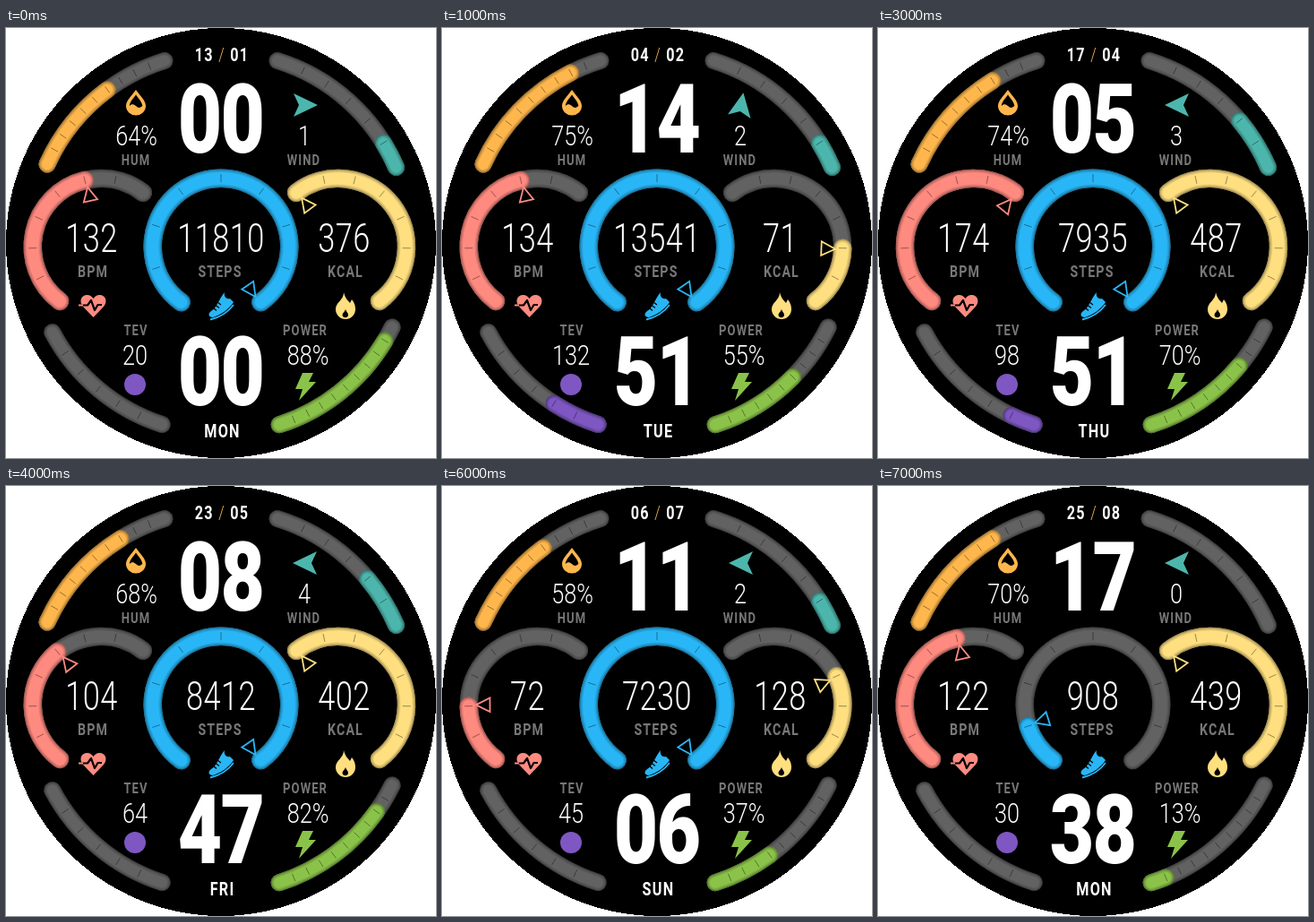
Animation, 480 px wide and 480 px high, one loop 8000 ms. Source, as an HTML page:

```html
<!DOCTYPE html>
<html lang="en">
<head>
<meta charset="utf-8">
<title>Watch face</title>
<style>
html, body { margin: 0; width: 100%; height: 100%; overflow: hidden; background: #fff; }
svg { display: block; width: 100vw; height: 100vh; }
text { font-family: Roboto, "Open Sans", sans-serif; text-anchor: middle; fill: #fff; }
.big { font-size: 108px; font-weight: 800; letter-spacing: -2px; }
.main { font-size: 43.5px; font-weight: 350; letter-spacing: .5px; }
.mid { font-size: 32px; font-weight: 350; }
.date { font-size: 20.5px; font-weight: 600; letter-spacing: 1.6px; }
.label { font-size: 18px; font-weight: 600; fill: #777; letter-spacing: 1.4px; }
.small { font-size: 16.5px; }
</style>
</head>
<body>
<svg id="face" viewBox="0 0 480 480" xmlns="http://www.w3.org/2000/svg"></svg>
<script>
const STEP = 1000;
const NARROW = .79; // one condensed cut for all lettering
const GRAY = '#626262', ORANGE = '#ffb74d', TEAL = '#4db6ac', RED = '#ff8a80',
      BLUE = '#29b6f6', YELLOW = '#ffdf80', PURPLE = '#7e57c2', GREEN = '#8bc34a';
const DAYS = ['MON', 'TUE', 'WED', 'THU', 'FRI', 'SAT', 'SUN'];

// wind: [speed, level of 6, heading]; bpm, kcal: [value, level of 7]
const STATES = [
  { day: '13', time: ['00', '00'], hum: 64, wind: [1, 1, 0], bpm: [132, 5], steps: 11810, kcal: [376, 7], score: 20, power: 88 },
  { day: '04', time: ['14', '51'], hum: 75, wind: [2, 1, -80], bpm: [134, 5], steps: 13541, kcal: [71, 2], score: 132, power: 55 },
  { day: '12', time: ['19', '23'], hum: 54, wind: [12, 6, 180], bpm: [66, 2], steps: 14638, kcal: [455, 7], score: 110, power: 8 },
  { day: '17', time: ['05', '51'], hum: 74, wind: [3, 2, 180], bpm: [174, 7], steps: 7935, kcal: [487, 7], score: 98, power: 70 },
  { day: '23', time: ['08', '47'], hum: 68, wind: [4, 2, 180], bpm: [104, 4], steps: 8412, kcal: [402, 7], score: 64, power: 82 },
  { day: '28', time: ['23', '33'], hum: 62, wind: [6, 3, 12], bpm: [99, 4], steps: 9919, kcal: [321, 7], score: 12, power: 18 },
  { day: '06', time: ['11', '06'], hum: 58, wind: [2, 1, 180], bpm: [72, 2], steps: 7230, kcal: [128, 3], score: 45, power: 37 },
  { day: '25', time: ['17', '38'], hum: 70, wind: [0, 0, 180], bpm: [122, 5], steps: 908, kcal: [439, 7], score: 30, power: 13 }
];

// Angles in degrees, clockwise from the right; fill runs from a to b.
const edge = { x: 240, y: 240, r: 213, w: 19 };
const ring = { y: 244, r: 76.3, w: 20.4, pointer: true };
const GAUGES = {
  hum: { ...edge, a: 204.4, b: 252.8, n: 10, color: ORANGE },
  wind: { ...edge, a: -23.4, b: -72.8, n: 6, color: TEAL },
  score: { ...edge, a: 108, b: 152.1, n: 6, color: PURPLE },
  power: { ...edge, a: 72.2, b: 26.2, n: 10, color: GREEN },
  bpm: { ...ring, x: 106, a: 127, b: 308, n: 7, color: RED },
  steps: { ...ring, x: 240, a: 125.5, b: 414.5, n: 8, color: BLUE },
  kcal: { ...ring, x: 371, a: 53, b: -128, n: 7, color: YELLOW }
};

const polar = (g, deg, r) => {
  const t = deg * Math.PI / 180;
  return (g.x + r * Math.cos(t)).toFixed(2) + ' ' + (g.y + r * Math.sin(t)).toFixed(2);
};

// A rounded bar with softly darkened edges.
function tube(g, end, color) {
  const big = Math.abs(end - g.a) > 180 ? 1 : 0, sweep = end > g.a ? 1 : 0;
  const d = `M${polar(g, g.a, g.r)}A${g.r} ${g.r} 0 ${big} ${sweep} ${polar(g, end, g.r)}`;
  const layer = (c, w, o) => `<path d="${d}" stroke="${c}" stroke-width="${w}" stroke-opacity="${o}"/>`;
  return '<g fill="none" stroke-linecap="round">' + layer(color, g.w, 1) + layer('#000', g.w, .36) +
    layer(color, g.w - 2, .4) + layer(color, g.w - 4, .5) + layer(color, g.w - 7, 1) + '</g>';
}

function gauge(g, level) {
  const end = g.a + (g.b - g.a) * level;
  let out = tube(g, g.b, GRAY), ticks = '';
  if (level > 0) out += tube(g, end, g.color);
  for (let i = 1; i < g.n; i++) {
    const t = g.a + (g.b - g.a) * i / g.n;
    ticks += `M${polar(g, t, g.r - 4.5)}L${polar(g, t, g.r + 4.5)}`;
  }
  out += `<path d="${ticks}" stroke="#000" stroke-opacity=".4"/>`;
  if (g.pointer) {
    out += `<path d="M68 0L52.500 -7.800V7.800Z" transform="translate(${g.x} ${g.y}) rotate(${end + 1})"
      fill="#000" stroke="${g.color}" stroke-width="1.8"/>`;
  }
  return out;
}

const text = (cls, x, y, s) =>
  `<text class="${cls}" transform="translate(${x} ${y}) scale(${NARROW} 1)">${s}</text>`;
const shape = (d, fill) => `<path d="${d}" fill="${fill}"/>`;
const line = (d, color, w) => `<path d="${d}" fill="none" stroke="${color}" stroke-width="${w}" stroke-linejoin="round"/>`;

const ICONS =
  shape('M145 69C150 76 156 81 156 87A11 10.5 0 0 1 134 87C134 81 140 76 145 69Z', ORANGE) +
  shape('M145 74.5C149 80 152 83 152.3 87C149 90 147 89 145 87C142 84.5 140 85 137.8 87C138 83 141 80 145 74.5Z', '#000') +
  shape('M97.5 323L86 311C81 305 84 298 90.5 298C94 298 96 300 97.5 302C99 300 101 298 104.5 298C111 298 114 305 109 311Z', RED) +
  line('M84 309.5H91L95 304L99 315L102.5 309H107', '#000', 2.2) +
  line('M81 309.5H86', RED, 2) +
  shape('M377 295C379 303 382 304 384 307L386 303C389 307 390 310 390 314A11 11 0 0 1 368 314C368 306 377 304 377 295Z', YELLOW) +
  shape('M379 314C380 317 382 318 382 320.5A3.3 3.3 0 0 1 375.5 320.5C375.5 318 378 317 379 314Z', '#000') +
  shape('M244 295C243 300 246 303 250 302L254 306C249 314 240 320 231 323C226 323 225 319 229 316C235 313 238 302 244 295Z', BLUE) +
  line('M228 325.5C239 323 248 317 254 309', BLUE, 1.8) +
  line('M236 306L240 309M234 309.5L238 312.5M231.5 312.5L235 315.5', '#000', 1.2) +
  shape('M331 385H343L338 395H346L327 416L331 403H323Z', GREEN) +
  `<circle cx="144" cy="398" r="12" fill="${PURPLE}"/>`;

const LABELS =
  text('label small', 145, 153, 'HUM') + text('label small', 332.5, 153, 'WIND') +
  text('label', 97, 278, 'BPM') + text('label', 239, 278, 'STEPS') + text('label', 379, 278, 'KCAL') +
  text('label small', 145, 343, 'TEV') + text('label small', 334, 343, 'POWER');

function draw(i) {
  const s = STATES[i];
  const levels = {
    hum: Math.round(s.hum / 10) / 10,
    wind: s.wind[1] / 6,
    score: Math.floor(s.score / 65) / 6,
    power: Math.max(1, Math.round(s.power / 10)) / 10,
    bpm: s.bpm[1] / 7,
    steps: Math.min(1, Math.floor(s.steps / 900) / 8),
    kcal: s.kcal[1] / 7
  };
  const bars = Object.keys(GAUGES).map(k => gauge(GAUGES[k], levels[k])).join('');
  document.getElementById('face').innerHTML =
    '<circle cx="240" cy="240" r="240" shape-rendering="crispEdges"/>' + bars + ICONS + LABELS +
    `<path d="M14 0L-13 -13L-7 0L-13 13Z" fill="${TEAL}" transform="translate(334 86) rotate(${s.wind[2]})"/>` +
    text('date', 241, 37, `${s.day} <tspan fill="${ORANGE}" font-weight="300">/</tspan> 0${i + 1}`) +
    text('date', 241.5, 457, DAYS[i % 7]) +
    text('big', 239.5, 139, s.time[0]) + text('big', 239.5, 421, s.time[1]) +
    text('mid', 145.5, 131, s.hum + '%') + text('mid', 333, 131, s.wind[0]) +
    text('mid', 144, 376, s.score) + text('mid', 337, 376, s.power + '%') +
    text('main', 95.5, 250, s.bpm[0]) + text('main', 240, 250, s.steps) + text('main', 377.5, 250, s.kcal[0]);
}

let shown = -1;
const start = performance.now();
function tick(now) {
  const i = Math.floor(Math.max(0, now - start) / STEP) % STATES.length;
  if (i !== shown) draw(shown = i);
  requestAnimationFrame(tick);
}
draw(shown = 0);
requestAnimationFrame(tick);
</script>
</body>
</html>
```
